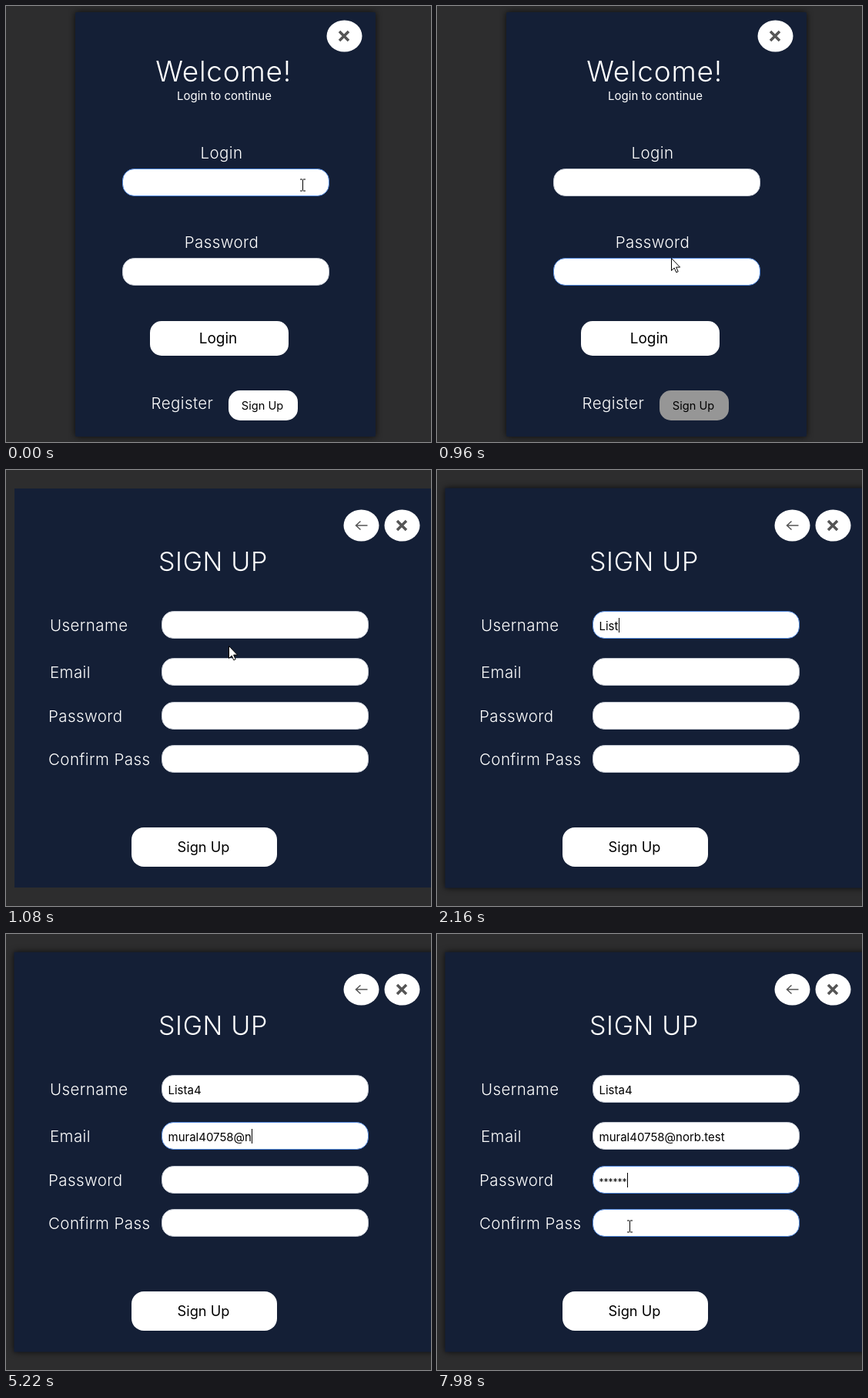
Write an HTML page that moves like this. It is 552 by 566 pixels and loops after 8 s.

```html
<!DOCTYPE html>
<html lang="en">
<head>
<meta charset="utf-8">
<title>Sign up form</title>
<style>
  html, body { margin: 0; width: 100%; height: 100%; overflow: hidden; background: #2d2d2e; }
  svg { display: block; font-family: Inter, "Open Sans", sans-serif; }
  .win, .shade { fill: #141f36; }
  .shade { filter: drop-shadow(0 0 4px rgba(0, 0, 0, .75)); }
  .btn, .light { fill: #fff; }
  .field { fill: #fff; stroke: #c4c9d3; }
  .field.on { stroke: #4f86dc; }
  .btn.hover { fill: #969696; }
  .dark { fill: #000; }
  .icon { fill: none; stroke: #555; }
</style>
</head>
<body>
<svg width="552" height="566" viewBox="0 0 552 566">
  <g id="login"></g>
  <g id="signup"></g>
  <path id="beam" fill="none" stroke="#000" d="M-3.5-7.5h3m1 0h3M0-7v14M-3.5 7.5h3m1 0h3"/>
  <path id="arrow" fill="#fff" stroke="#000" d="M-.5.5v16l3.7-3.5 2.6 5.8 2.4-1.1-2.6-5.6h5z"/>
</svg>
<script>
const NS = 'http://www.w3.org/2000/svg';
const $ = id => document.getElementById(id);

function add(parent, tag, attrs, content = '') {
  const el = document.createElementNS(NS, tag);
  for (const k in attrs) el.setAttribute(k, attrs[k]);
  el.textContent = content;
  return parent.appendChild(el);
}
function label(g, text, x, y, size, cls = 'light', anchor = 'middle') {
  return add(g, 'text', {
    x, y, class: cls, 'font-size': size, 'text-anchor': anchor,
    'font-weight': size < 20 ? 400 : 300,
    'letter-spacing': size < 20 ? 0 : '.02em'
  }, text);
}
function button(g, x, y, w, h, r) {
  return { el: add(g, 'rect', { class: 'btn', x, y, width: w, height: h, rx: r }), x, y, w, h };
}
function inputBox(g, x, y) {
  const w = 269, h = 36;
  const el = add(g, 'rect', { class: 'field', x: x + .5, y: y + .5, width: w - 1, height: h - 1, rx: 15 });
  return { el, x, y, w, h };
}
function roundButton(g, x, y, icon, width) {
  add(g, 'ellipse', { class: 'light', cx: x, cy: y, rx: 23, ry: 20.5 });
  add(g, 'path', { class: 'icon', d: icon, 'stroke-width': width, transform: `translate(${x} ${y})` });
}
const CROSS = 'M-6.5-6l12 12m0-12l-12 12';
const BACK = 'M8 0H-7m6-5.5L-7 0l6 5.5';

// Login window
const login = $('login');
add(login, 'rect', { class: 'shade', x: 90, y: 8, width: 390, height: 551, rx: 2 });
roundButton(login, 439.5, 39, CROSS, 3.5);
label(login, 'Welcome!', 282.5, 98, 37);
label(login, 'Login to continue', 283.5, 122, 15);
label(login, 'Login', 280, 198, 20.5);
label(login, 'Password', 280, 314, 20.5);
const loginFields = [211, 327].map(y => inputBox(login, 151, y));
button(login, 187, 409, 180, 45, 15);
const register = button(login, 289, 499, 90, 39, 15);
label(login, 'Login', 275.5, 438, 19, 'dark');
label(login, 'Register', 229, 523, 20.5);
label(login, 'Sign Up', 333, 524, 14.6, 'dark');

// Sign-up window
const signup = $('signup');
const shade = add(signup, 'rect', { class: 'shade', x: 10.5, y: 23.5, width: 600, height: 519 });
add(signup, 'rect', { class: 'win', x: 11, y: 24, width: 600, height: 518 });
roundButton(signup, 461.5, 72, BACK, 1.5);
roundButton(signup, 514.5, 72, CROSS, 3.5);
label(signup, 'SIGN UP', 269, 131, 34);
button(signup, 163, 464, 189, 51, 16);
label(signup, 'Sign Up', 256.5, 496, 18.2, 'dark');

// Typed bursts: text, first key, ms per key
const signupFields = [
  { name: 'Username', x: 57, y: 183, focus: 1380, bursts: [['Lista4', 1700, 153]] },
  { name: 'Email', x: 57, y: 244, focus: 3060,
    bursts: [['mural', 3360, 100], ['40758', 4200, 45], ['@', 4800, 0], ['norb.test', 5220, 135]] },
  { name: 'Password', x: 55, y: 301, focus: 6900, size: 12, bursts: [['******', 7200, 108]] },
  { name: 'Confirm Pass', x: 55, y: 357, focus: Infinity, bursts: [] }
].map(({ name, x, y, focus, size = 15, bursts }) => {
  label(signup, name, x, y + 26, 20.5, 'light', 'start');
  return {
    ...inputBox(signup, 202, y),
    focus,
    keys: bursts.flatMap(([text, from, step]) =>
      [...text].map((char, i) => ({ char, time: from + i * step }))),
    typed: label(signup, '', 210.5, y + 25, size, 'dark', 'start'),
    caret: add(signup, 'rect', { class: 'dark', y: y + 9, width: 1, height: 19 })
  };
});
const allKeys = signupFields.flatMap(f => f.keys);

// Pointer moves, each easing out from where the last one ended
const CLICK = 875, SWITCH = 1020, BLINK = 300;
const moves = [
  { start: 0, dur: CLICK, x: 333, y: 518 },
  { start: CLICK, dur: 205, x: 290, y: 228 },
  { start: 1080, dur: 300, x: 300, y: 203 },
  { start: 2760, dur: 300, x: 255, y: 266 },
  { start: 6600, dur: 300, x: 257, y: 322 },
  { start: 7800, dur: 180, x: 250, y: 379 }
];
const home = { x: 385, y: 232 };

function pointerAt(t) {
  const i = moves.findLastIndex(m => m.start <= t);
  const to = moves[i], from = moves[i - 1] || home;
  const k = 1 - (1 - Math.min(1, (t - to.start) / to.dur)) ** 2;
  const mix = axis => Math.round(from[axis] + (to[axis] - from[axis]) * k);
  // Typing hides the pointer until it moves again
  const visible = !allKeys.some(key => key.time <= t && key.time > to.start);
  return { x: mix('x'), y: mix('y'), visible };
}
const show = (el, on) => { el.style.display = on ? '' : 'none'; };

function draw(t) {
  const p = pointerAt(t);
  const inside = (b, pad) => p.visible &&
    p.x >= b.x - pad && p.x <= b.x + b.w + pad && p.y >= b.y - pad && p.y <= b.y + b.h + pad;
  const second = t >= SWITCH;
  const fields = second ? signupFields : loginFields;
  show(login, !second);
  show(signup, second);
  shade.style.opacity = Math.max(0, Math.min(1, (t - 1080) / 300));
  register.el.classList.toggle('hover', inside(register, 0) || t >= CLICK);

  const active = signupFields.findLast(f => f.focus <= t);
  for (const f of fields) f.el.classList.toggle('on', f === active || inside(f, 1));
  for (const f of signupFields) {
    const done = f.keys.filter(key => key.time <= t);
    const last = done.length ? done[done.length - 1].time : f.focus;
    f.typed.textContent = done.map(key => key.char).join('');
    show(f.caret, f === active && Math.floor((t - last) / BLINK) % 2 === 0);
    if (second) f.caret.setAttribute('x', Math.round(211 + (done.length && f.typed.getComputedTextLength())));
  }

  const overField = fields.some(f => inside(f, -1));
  show($('beam'), p.visible && overField);
  show($('arrow'), p.visible && !overField);
  $('beam').setAttribute('transform', `translate(${p.x + .5} ${p.y + .5})`);
  $('arrow').setAttribute('transform', `translate(${p.x} ${p.y})`);
}

const start = performance.now();
function tick() {
  // The screen is refreshed every 60 ms
  const t = (performance.now() - start) % 8000;
  draw(Math.floor(t / 60) * 60);
  requestAnimationFrame(tick);
}
tick();
</script>
</body>
</html>
```
